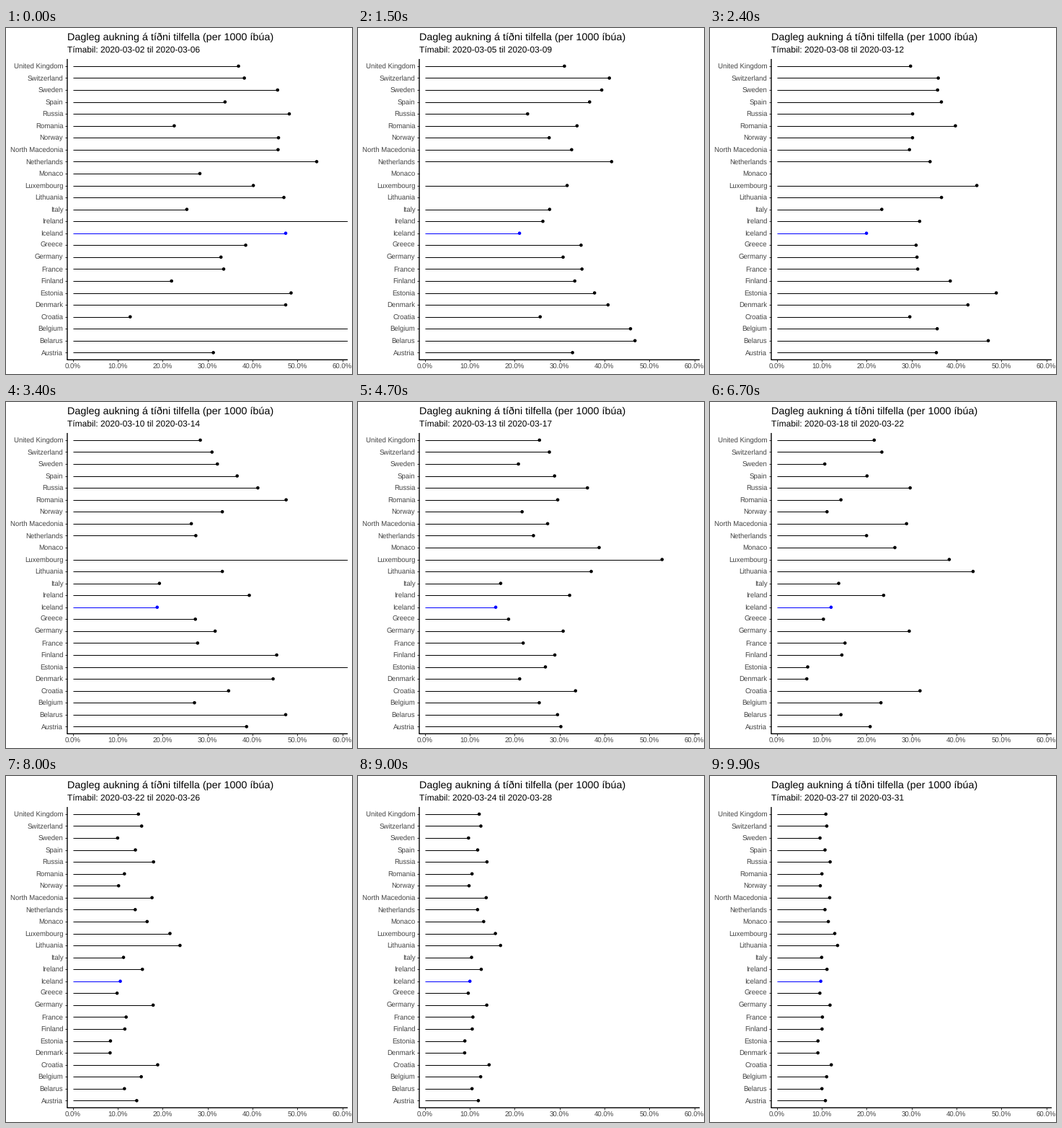
Recreate the animation shown at these times as a matplotlib script. Size 480x480 px, loop 10 s.

```python
import matplotlib.pyplot as plt
import numpy as np
from matplotlib.animation import FuncAnimation
from matplotlib.patches import Rectangle

SIZE, FRAMES, INTERVAL = 480, 100, 100
ROW0, ROW_STEP = 52.9, 16.56
LEFT, RIGHT = 85, 474
TOP, BOTTOM = ROW0 - 0.6 * ROW_STEP, ROW0 + 24.6 * ROW_STEP
ZERO, PER_PCT = 92.5, 6.234
GREY, TICK = "#444444", "#333333"
HIGHLIGHT = "Iceland"

# Growth in percent at the key steps; afterwards every country settles near SETTLED
KEYS = (0, 15, 34, 67)
SETTLED, FADE = 9.5, 15
GROWTH = {
    "United Kingdom": (36.9, 31.1, 28.4, 21.7),
    "Switzerland": (38.2, 41.1, 31.0, 23.4),
    "Sweden": (45.6, 39.4, 32.2, 10.7),
    "Spain": (33.9, 36.7, 36.6, 20.1),
    "Russia": (48.2, 22.9, 41.2, 29.7),
    "Romania": (22.6, 33.9, 47.5, 14.3),
    "Norway": (45.8, 27.7, 33.3, 11.2),
    "North Macedonia": (45.7, 32.7, 26.4, 28.9),
    "Netherlands": (54.3, 41.6, 27.4, 20.0),
    "Monaco": (28.3, 40, 50, 26.3),
    "Luxembourg": (40.2, 31.7, 65, 38.4),
    "Lithuania": (47.0, 40, 33.3, 43.7),
    "Italy": (25.4, 27.8, 19.3, 13.8),
    "Ireland": (65, 26.3, 39.3, 23.8),
    "Iceland": (47.4, 21.1, 18.8, 12.1),
    "Greece": (38.5, 34.8, 27.3, 10.4),
    "Germany": (33.0, 30.8, 31.7, 29.5),
    "France": (33.6, 35.0, 27.8, 15.2),
    "Finland": (22.0, 33.4, 45.4, 14.5),
    "Estonia": (48.6, 37.8, 65, 6.9),
    "Denmark": (47.4, 40.8, 44.6, 6.7),
    "Croatia": (12.8, 25.7, 34.7, 31.9),
    "Belgium": (65, 45.8, 27.1, 23.2),
    "Belarus": (65, 46.8, 47.4, 14.3),
    "Austria": (31.3, 32.9, 38.7, 20.8),
}
# Steps without data: first hidden, first shown again
GAPS = {"Monaco": (5, 44), "Lithuania": (5, 20)}


def track(name, values):
    """Dot position at every step: geometric between keys, then a fade."""
    steps = np.arange(FRAMES)
    pct = np.exp(np.interp(steps, KEYS, np.log(values)))
    late = np.maximum(steps - KEYS[-1], 0)
    pct = SETTLED + (pct - SETTLED) * np.exp(-late / FADE)
    if name in GAPS:
        pct[slice(*GAPS[name])] = np.nan
    return ZERO + PER_PCT * pct


tracks = np.array([track(*item) for item in GROWTH.items()])
rows = ROW0 + ROW_STEP * np.arange(len(GROWTH))
colors = ["blue" if name == HIGHLIGHT else "black" for name in GROWTH]

plt.rcParams.update({
    "font.family": "Liberation Sans",
    "text.hinting": "none",
    "toolbar": "None",
})
fig = plt.figure(figsize=(SIZE / 72, SIZE / 72), dpi=72, facecolor="white")
ax = fig.add_axes([0, 0, 1, 1])
ax.axis("off")


def label(x, y, text, size, color="black", ha="left"):
    return ax.text(x, y, text, fontsize=size, color=color, ha=ha, va="baseline")


def rule(xs, ys, color="black", width=1.0, snap=True):
    ax.plot(xs, ys, color=color, lw=width, solid_capstyle="butt", snap=snap)


label(LEFT, 17, "Dagleg aukning á tíðni tilfella (per 1000 íbúa)", 14.4)
period = label(LEFT, 34, "", 12)

for name, y in zip(GROWTH, rows):
    label(LEFT - 5.7, y + 3.1, name, 9.6, GREY, "right")
    rule([LEFT - 3, LEFT], [y, y], TICK)
for pct in range(0, 70, 10):
    x = ZERO + PER_PCT * pct
    label(x, 473, f"{pct:.1f}%", 9.6, GREY, "center")
    rule([x, x], [BOTTOM, BOTTOM + 3], TICK)
rule([LEFT, LEFT], [TOP, BOTTOM], width=1.4, snap=False)
rule([LEFT - 0.5, RIGHT], [BOTTOM, BOTTOM], width=1.4, snap=False)

panel = Rectangle((LEFT, TOP), RIGHT - LEFT, BOTTOM - TOP, transform=ax.transData)
stems = ax.hlines(rows, ZERO, ZERO, colors=colors, lw=1)
stems.set_snap(True)
dots = ax.scatter(np.full(len(rows), ZERO), rows, s=4.6 ** 2, c=colors, lw=0, zorder=3)
for art in (stems, dots):
    art.set_clip_path(panel)
ax.set(xlim=(0, SIZE), ylim=(SIZE, 0))


def draw(i):
    day = 2 + 25 * i // (FRAMES - 1)
    period.set_text(f"Tímabil: 2020-03-{day:02d} til 2020-03-{day + 4:02d}")
    ends = tracks[:, i]
    stems.set_segments([[(ZERO, y), (x, y)] for x, y in zip(ends, rows)])
    dots.set_offsets(np.column_stack([ends, rows]))
    return period, stems, dots


anim = FuncAnimation(fig, draw, frames=FRAMES, interval=INTERVAL, repeat=True, repeat_delay=0)
plt.show()
```
